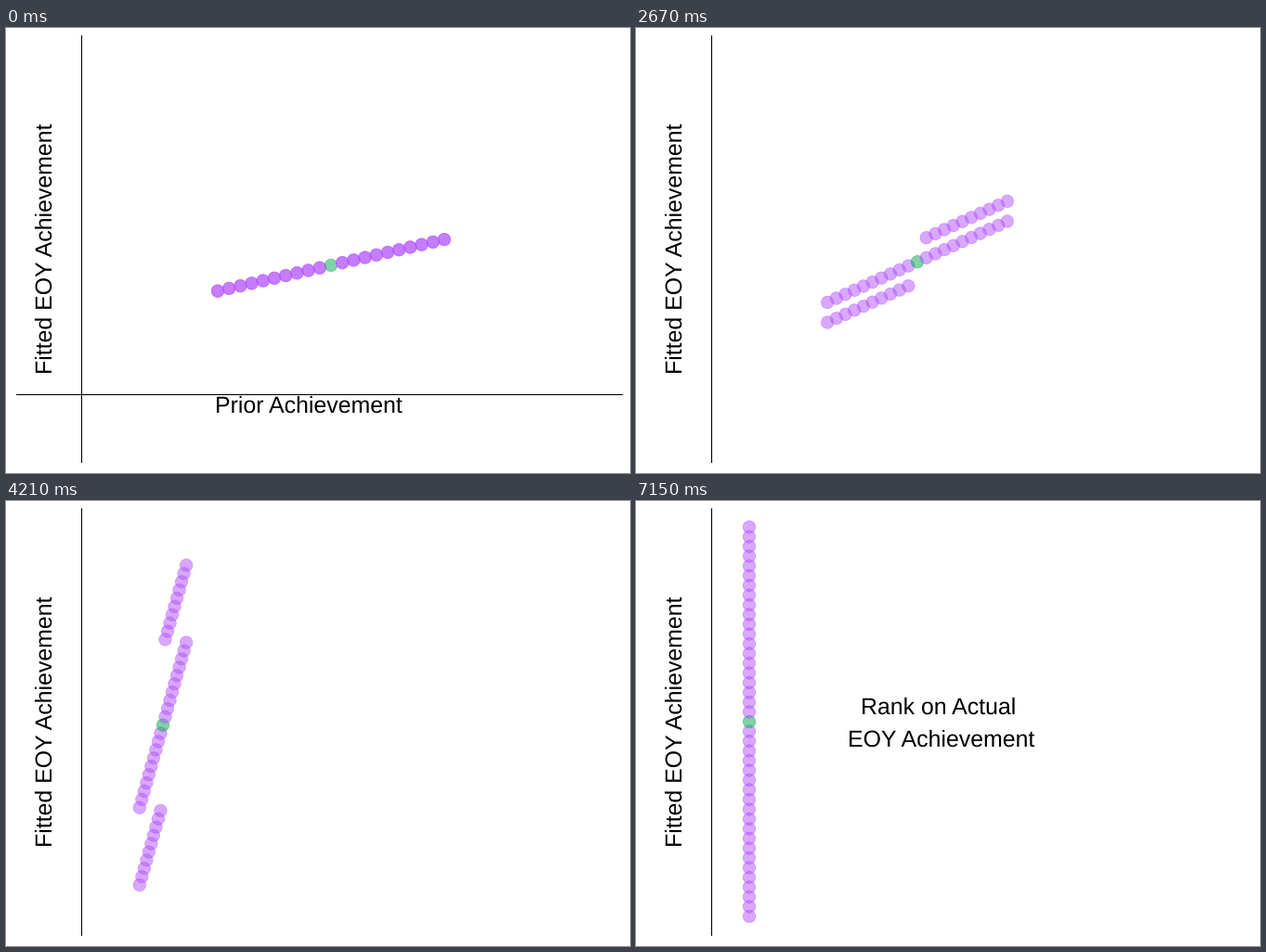
Write a matplotlib script that moves like this. It is 672x480 px and loops after 8 s.

```python
import numpy as np
import matplotlib.pyplot as plt
from matplotlib.animation import FuncAnimation

W, H, DPI = 672, 480, 72
LOOP, INTERVAL = 8000, 20
START, STEP, STEPS = 500, 70, 86
CAPTION_AT = 7150

PURPLE = (0.70, 0.32, 1.0, 0.5)
GREEN = (0.0, 0.66, 0.29, 0.5)

plt.rcParams["font.family"] = "Liberation Sans"
plt.rcParams["text.hinting"] = "none"

fig = plt.figure(figsize=(W / DPI, H / DPI), dpi=DPI, facecolor="white")
ax = fig.add_axes([0, 0, 1, 1])
ax.set_xlim(0, W)
ax.set_ylim(H, 0)
ax.axis("off")


def line(xs, ys):
    return ax.plot(xs, ys, color="black", lw=1.07, snap=False,
                   solid_capstyle="butt")[0]


def label(x, y, text, rotation=0):
    return ax.text(x, y, text, size=24.88, color="black", ha="left",
                   va="baseline", rotation=rotation, rotation_mode="anchor")


# Every rank but the middle one shares its starting place with another.
rank = np.arange(-20, 21)
pair = np.where(np.abs(rank) > 10, rank - 10 * np.sign(rank), rank)
begin = np.column_stack([350 + 12.2 * pair, 255.9 - 2.78 * pair])
end = np.column_stack([np.full(rank.size, 122.0), 238 - 10.5 * rank])

dots = ax.scatter(*begin.T, s=13.5 ** 2, linewidths=0.71, zorder=3,
                  c=[PURPLE if r else GREEN for r in rank])
dots.set_edgecolor(dots.get_facecolor())

line([81.5, 81.5], [8, 469])
label(50, 373.2, "Fitted EOY Achievement", 90)
x_axis = [line([11, 664.5], [395.5, 395.5]),
          label(224.6, 415, "Prior Achievement")]
caption = [label(242.2, 229.5, "Rank on Actual"),
           label(228.4, 264.5, "EOY Achievement")]


def ease(t):
    """Cubic in and out."""
    return 4 * t ** 3 if t < 0.5 else 1 - 4 * (1 - t) ** 3


def update(n):
    ms = (n + 0.5) * INTERVAL
    step = 0 if ms < START else min(STEPS, int((ms - START) // STEP) + 1)
    dots.set_offsets(begin + (end - begin) * ease(step / STEPS))
    for part in x_axis:
        part.set_visible(step == 0)
    for part in caption:
        part.set_visible(ms >= CAPTION_AT)
    return [dots, *x_axis, *caption]


anim = FuncAnimation(fig, update, frames=LOOP // INTERVAL, interval=INTERVAL,
                     repeat=True, repeat_delay=0)
plt.show()
```
